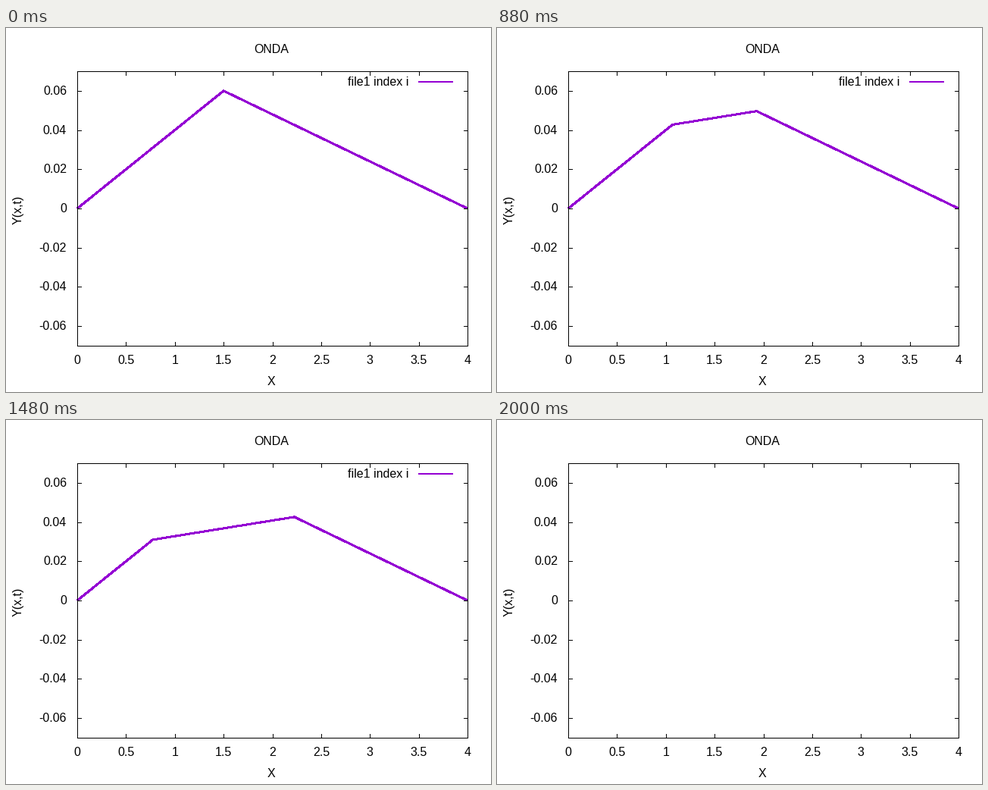
Recreate the animation shown at these times as a matplotlib script. Size 640 by 480 pixels, loop 2020 ms.

```python
import numpy as np
import matplotlib.pyplot as plt
from matplotlib.animation import FuncAnimation

W, H, DPI = 640, 480, 80
PX = 72 / DPI                      # points per pixel
FRAMES, STEP_MS = 101, 20
LEFT, RIGHT, TOP, BOTTOM = 94, 609, 57, 419
LENGTH, Y_MAX = 4.0, 0.07
PEAK_X, PEAK_Y = 1.5, 0.06
SPEED = 0.0098                     # kink travel per frame
TICK = 6
PURPLE = "#9400D3"

plt.rcParams["font.family"] = "Liberation Sans"
plt.rcParams["font.size"] = 16 * PX

fig = plt.figure(figsize=(W / DPI, H / DPI), dpi=DPI, facecolor="white")
ax = fig.add_axes([0, 0, 1, 1])
ax.set_xlim(0, W)
ax.set_ylim(H, 0)
ax.axis("off")


def to_px(x, y):
    px = LEFT + np.asarray(x) * (RIGHT - LEFT) / LENGTH
    py = (TOP + BOTTOM) / 2 - np.asarray(y) * (BOTTOM - TOP) / (2 * Y_MAX)
    return px, py


def stroke(xs, ys, color="black", width=1, z=3):
    line, = ax.plot(xs, ys, color=color, lw=width * PX, antialiased=False,
                    solid_capstyle="butt", snap=False, zorder=z)
    return line


def label(x, y, text, ha="center", **kw):
    return ax.text(x, y, text, ha=ha, va="baseline", color="black", **kw)


def draw_frame():
    l, r, t, b = LEFT + 0.5, RIGHT + 0.5, TOP + 0.5, BOTTOM + 0.5
    stroke([LEFT, RIGHT + 1], [t, t])
    stroke([LEFT, RIGHT + 1], [b, b])
    stroke([l, l], [TOP, BOTTOM + 1])
    stroke([r, r], [TOP, BOTTOM + 1])

    for v in np.arange(0, 4.5, 0.5):
        x = int(to_px(v, 0)[0] + 0.5)
        stroke([x + 0.5] * 2, [TOP, TOP + TICK])
        stroke([x + 0.5] * 2, [BOTTOM + 1 - TICK, BOTTOM + 1])
        label(x, 443, f"{v:g}")

    for k in range(-3, 4):
        y = int(to_px(0, 0.02 * k)[1] + 0.5)
        stroke([LEFT, LEFT + TICK], [y + 0.5] * 2)
        stroke([RIGHT + 1 - TICK, RIGHT + 1], [y + 0.5] * 2)
        label(80, y + 5, f"{0.02 * k:g}", ha="right")

    label(350, 33, "ONDA")
    label(349.5, 471, "X")
    label(21, 239.5, "Y(x,t)", rotation=90, rotation_mode="anchor")


def string_shape(shift):
    """Plucked string: the peak splits into two kinks moving apart."""
    a, b = PEAK_X - shift, PEAK_X + shift
    ya = PEAK_Y * a / PEAK_X
    yb = PEAK_Y * (LENGTH - b) / (LENGTH - PEAK_X)
    return to_px([0, a, b, LENGTH], [0, ya, yb, 0])


draw_frame()
key_text = label(531, 76, "file1 index i", ha="right")
key_line = stroke([544, 590], [71, 71], PURPLE, 2, z=2)
wave = stroke([], [], PURPLE, 2, z=2)


def update(i):
    shown = i < FRAMES - 1         # the last frame holds only the empty plot
    for part in (key_text, key_line, wave):
        part.set_visible(shown)
    wave.set_data(*string_shape(SPEED * i))
    return key_text, key_line, wave


anim = FuncAnimation(fig, update, frames=FRAMES, interval=STEP_MS,
                     repeat=True, repeat_delay=0, blit=False)
plt.show()
```
